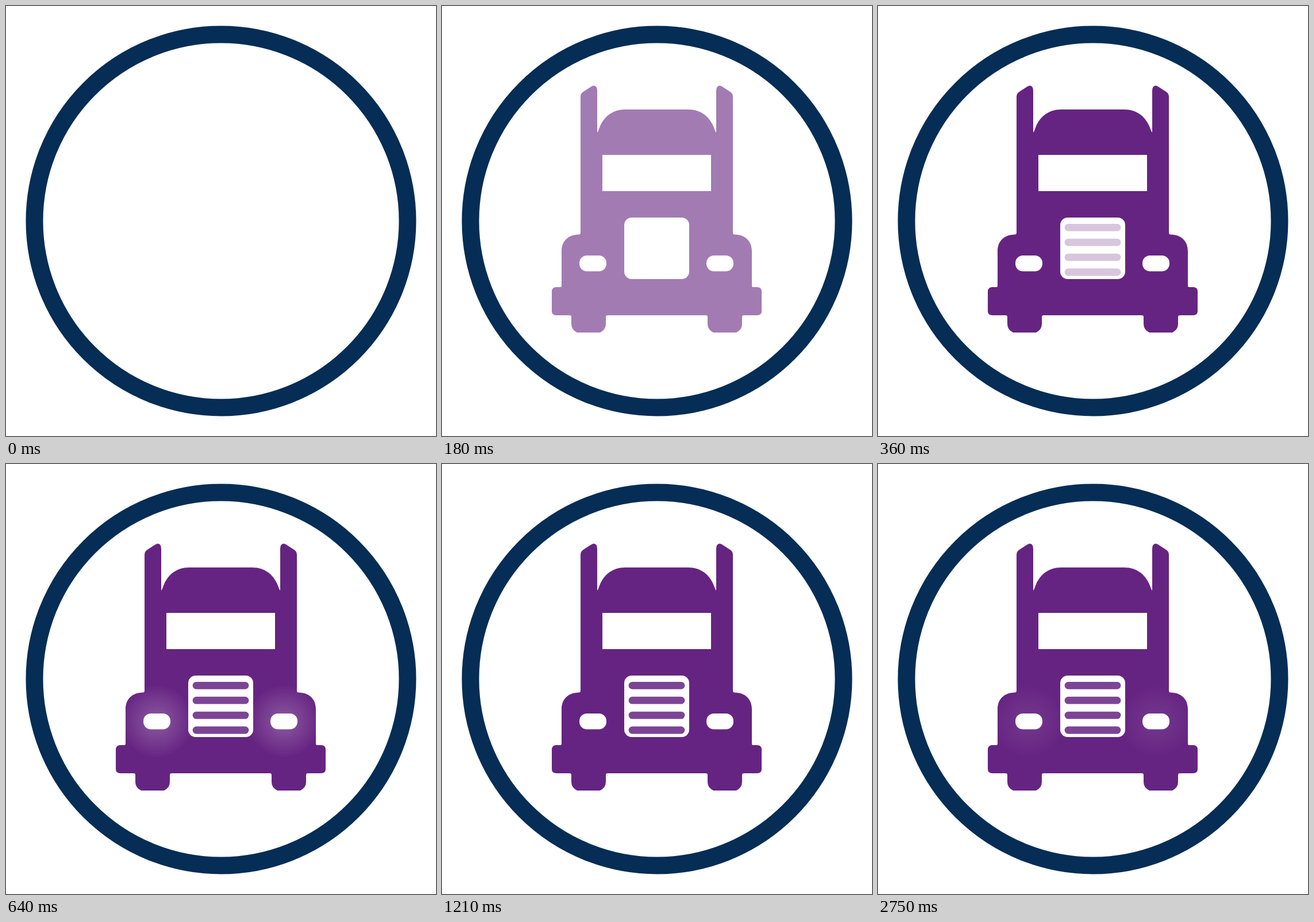
Write an HTML page that moves like this. It is 748x748 px and loops after 3.81 s.

```html
<!DOCTYPE html>
<html lang="en">
<head>
<meta charset="utf-8">
<title>Truck badge</title>
<style>
  html, body { margin: 0; width: 100%; height: 100%; overflow: hidden; background: #fff; }
  svg { display: block; width: 100vw; height: 100vh; }
</style>
</head>
<body>
<svg viewBox="0 0 748 748">
  <defs>
    <radialGradient id="light">
      <stop offset="0" stop-color="#fff" stop-opacity=".26"/>
      <stop offset="1" stop-color="#fff" stop-opacity="0"/>
    </radialGradient>
    <path id="half" d="M374.5 180H319C296 180 282 193 275 209L271.500 218Q270 221 270 218V147Q270 139 264 138.500Q262 138.500 260 140L246 149Q241 152 241 158V394Q241 397.500 238 397.500C219 398 208 409 208 427V487Q208 489 206 489H199Q191 489 191 497V531Q191 538 199 538H222Q225 538 225 541V553Q225 563 235 568H275Q285 563 285 553V541Q285 538 288 538H374.500Z"/>
  </defs>
  <circle cx="374" cy="374" r="324.500" fill="none" stroke="#052d55" stroke-width="30"/>
  <g id="truck" opacity="0">
    <g fill="#662482">
      <use href="#half"/>
      <use href="#half" transform="matrix(-1 0 0 1 747 0)"/>
    </g>
    <g id="glow" fill="url(#light)" opacity="0">
      <circle cx="262.500" cy="447.500" r="64"/>
      <circle cx="483.500" cy="447.500" r="64"/>
    </g>
    <g fill="#fff">
      <rect x="279" y="259" width="189" height="63"/>
      <rect x="317" y="368" width="113" height="107" rx="13"/>
      <rect x="239" y="434" width="47" height="27.500" rx="13"/>
      <rect x="460" y="434" width="47" height="27.500" rx="13"/>
    </g>
    <path id="bars" opacity="0" stroke="#7c4495" stroke-width="12.800" stroke-linecap="round"
      d="M331 385.300h85M331 411.200h85M331 437.100h85M331 463h85"/>
  </g>
</svg>
<script>
  const LOOP = 3810;
  const [truck, bars, glow] = ['truck', 'bars', 'glow'].map(id => document.getElementById(id));

  const fade = (t, start) => Math.min(1, Math.max(0, (t - start) / 300));
  const pulse = (t, start, period) => (1 - Math.cos(2 * Math.PI * (t - start) / period)) / 2;

  // Three quick flashes, a dark pause, then slower flashes that stop half lit.
  function glowLevel(t) {
    if (t < 541 || (t >= 1210 && t < 2240)) return 0;
    return t < 1210 ? pulse(t, 541, 223) : pulse(Math.min(t, 2750), 2187, 255);
  }

  function draw(now) {
    const t = now % LOOP;
    truck.setAttribute('opacity', fade(t, 0));
    bars.setAttribute('opacity', fade(t, 270));
    glow.setAttribute('opacity', glowLevel(t));
  }

  let start;
  function tick(now) {
    start ??= now;
    draw(now - start);
    requestAnimationFrame(tick);
  }
  requestAnimationFrame(tick);
</script>
</body>
</html>
```
